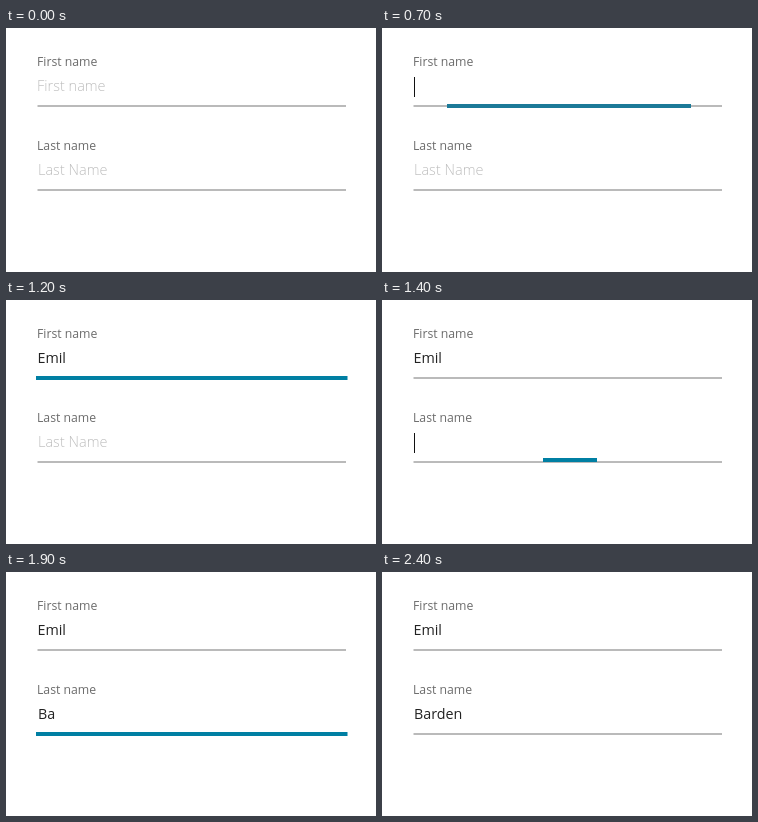
An HTML page that plays this animation: 370 by 244 pixels, repeating every 4.4 s.

```html
<!DOCTYPE html>
<html>
<head>
<meta charset="utf-8">
<style>
  html, body { margin: 0; width: 100%; height: 100%; overflow: hidden; background: #fff; }
  svg { display: block; }
  text { font: 14.3px "Open Sans", sans-serif; fill: #222; white-space: pre; }
  .label { font-size: 12.25px; fill: #6c6c6c; }
  .hint { font-weight: 300; font-size: 14.5px; fill: #bdbdbd; }
  .line { fill: #aaa; }
  .caret { fill: #111; }
</style>
</head>
<body>
<svg id="stage" width="370" height="244" viewBox="0 0 370 244"></svg>
<script>
const LOOP = 4400, STEP = 100;
const stage = document.getElementById("stage");

function add(tag, cls, attrs, text = "") {
  const el = document.createElementNS("http://www.w3.org/2000/svg", tag);
  el.setAttribute("class", cls);
  set(el, attrs);
  el.textContent = text;
  return stage.appendChild(el);
}

function set(el, attrs) {
  for (const key in attrs) el.setAttribute(key, attrs[key]);
}

function show(el, on) {
  el.style.display = on ? "" : "none";
}

// lineY: top of the underline; start/end: focus and blur times
function makeField(f) {
  const y = f.lineY;
  add("text", "label", { x: 31, y: y - 39 }, f.label);
  f.hintEl = add("text", "hint", { x: f.hintX, y: y - 14 }, f.hint);
  f.valueEl = add("text", "value", { x: f.valueX, y: y - 14 });
  add("rect", "line", { x: 31.5, y: y + 0.2, width: 308.5, height: 1.6 });
  f.caret = add("rect", "caret", { x: 32, y: y - 28, width: 1, height: 20 });
  f.bar = add("rect", "bar", { height: 4 });
  return f;
}

function drawField(f, t) {
  const focused = t >= f.start && t < f.end;
  const step = Math.floor((t - f.start) / STEP);
  const typed = Math.max(0, step - 3);
  show(f.hintEl, t < f.start);
  show(f.caret, focused && typed === 0);
  show(f.bar, focused);
  f.valueEl.textContent = f.value.slice(0, typed);
  if (!focused) return;
  if (step < 3) {
    set(f.bar, { x: f.barX - 47 * step, y: f.barY, width: 54 + 95 * step, fill: f.barColor });
  } else {
    set(f.bar, { x: 30, y: f.lineY - 1, width: 311.5, fill: "#007fa3" });
  }
}

const fields = [
  { label: "First name", hint: "First name", value: "Emil", lineY: 77, hintX: 31, valueX: 31.5,
    barX: 159, barY: 76, barColor: "#1c7a98", start: 500, end: 1400 },
  { label: "Last name", hint: "Last Name", value: "Barden", lineY: 161, hintX: 32, valueX: 32,
    barX: 161, barY: 158, barColor: "#007fa3", start: 1400, end: 2400 }
].map(makeField);

function frame() {
  const t = performance.now() % LOOP;
  fields.forEach(f => drawField(f, t));
  requestAnimationFrame(frame);
}
frame();
</script>
</body>
</html>
```
